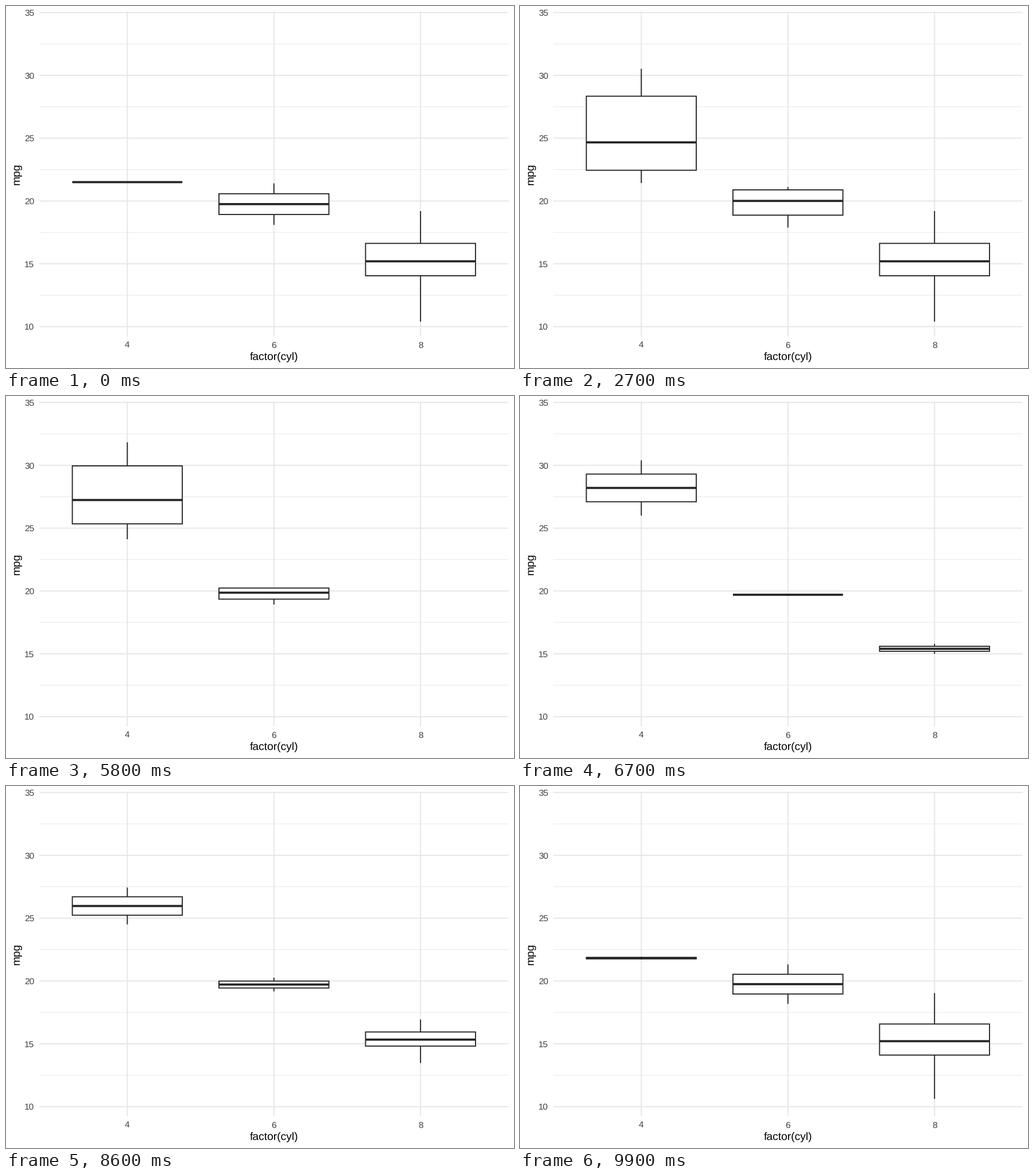
A matplotlib script for the animation above (10 s loop, 885 by 632 pixels).

```python
import matplotlib.pyplot as plt
import numpy as np
from matplotlib.animation import FuncAnimation
from matplotlib.patches import Polygon

W, H, DPI = 885, 632, 64
FRAMES, INTERVAL = 100, 100

PT = 126.4 / 72                    # pixels per typographic point
LINE = 1.873                       # base line weight in pixels
INK, GRID, TICK = "#252525", "#e6e6e6", "#404040"

LEFT, RIGHT, TOP, BOTTOM = 58.1, 875.4, 9.66, 576.8
STEP = (RIGHT - LEFT) / 3.2
UNIT = (BOTTOM - TOP) / 25.85
HALF = 0.375 * STEP

# Five-number summaries (min, q1, median, q3, max) per group and state
STATES = [
    [[21.5] * 5,
     [18.1, 18.925, 19.75, 20.575, 21.4],
     [10.4, 14.05, 15.2, 16.625, 19.2]],
    [[21.4, 22.8, 25.85, 30.9, 33.9],
     [17.8, 18.85, 20.1, 21.0, 21.0],
     None],
    [[26.0, 27.1, 28.2, 29.3, 30.4],
     [19.7] * 5,
     [15.0, 15.2, 15.4, 15.6, 15.8]],
]
# (first frame, last frame, from state, to state)
MOVES = [(11, 33, 0, 1), (45, 67, 1, 2), (79, 100, 2, 0)]

plt.rcParams["font.family"] = "Liberation Sans"
plt.rcParams["text.hinting"] = "no_hinting"


def px(size):
    """Pixels to points for the figure's dpi."""
    return size * 72 / DPI


def y_of(value):
    return TOP + (35.075 - value) * UNIT


def x_of(i):
    return LEFT + (i + 0.6) * STEP


fig = plt.figure(figsize=(W / DPI, H / DPI), dpi=DPI, facecolor="white")
ax = fig.add_axes([0, 0, 1, 1])
ax.set_xlim(0, W)
ax.set_ylim(H, 0)
ax.axis("off")


def line(xs, ys, color, weight, z):
    return ax.plot(xs, ys, color=color, lw=px(weight), zorder=z, snap=False,
                   solid_capstyle="butt")[0]


def label(x, y, text, size, color, **kw):
    ax.text(x, y, text, fontsize=px(size * PT), color=color,
            va="baseline", **kw)


def draw_panel():
    for v in np.arange(12.5, 35, 5):
        line([LEFT, RIGHT], [y_of(v)] * 2, GRID, LINE / 2, 1)
    for v in range(10, 36, 5):
        line([LEFT, RIGHT], [y_of(v)] * 2, GRID, LINE, 1)
        label(49.4, y_of(v) + 5.5, str(v), 8.8, TICK, ha="right")
    for i, name in enumerate("468"):
        line([x_of(i)] * 2, [TOP, BOTTOM], GRID, LINE, 1)
        label(x_of(i), 596.5, name, 8.8, TICK, ha="center")
    label(x_of(1), 618.5, "factor(cyl)", 11, "black", ha="center")
    ax.text(23.5, (TOP + BOTTOM) / 2, "mpg", fontsize=px(11 * PT),
            color="black", rotation=90, rotation_mode="anchor",
            ha="center", va="baseline")


class Box:
    def __init__(self, i):
        self.x = x_of(i)
        self.x0, self.x1 = self.x - HALF, self.x + HALF
        self.low = line([], [], INK, LINE, 3)
        self.high = line([], [], INK, LINE, 3)
        self.body = Polygon([[0, 0]] * 4, closed=True, fc="white", ec=INK,
                            lw=px(LINE), joinstyle="miter", zorder=4,
                            snap=False)
        ax.add_patch(self.body)
        self.mid = line([], [], INK, 2 * LINE, 5)
        self.parts = [self.low, self.high, self.body, self.mid]

    def show(self, stats):
        for part in self.parts:
            part.set_visible(stats is not None)
        if stats is None:
            return
        lo, q1, med, q3, hi = (y_of(v) for v in stats)
        self.low.set_data([self.x] * 2, [lo, q1])
        self.high.set_data([self.x] * 2, [q3, hi])
        self.body.set_xy([[self.x0, q1], [self.x0, q3],
                          [self.x1, q3], [self.x1, q1]])
        self.mid.set_data([self.x0, self.x1], [med, med])


def blend(a, b, t):
    # Groups without a partner leave or arrive only when the move ends
    if t >= 1:
        return b
    if a is None or b is None:
        return a
    return np.array(a) + (np.array(b) - np.array(a)) * t


def stats_at(frame):
    a, b, t = STATES[0], STATES[0], 0
    for start, end, src, dst in MOVES:
        if frame >= start:
            a, b = STATES[src], STATES[dst]
            t = min(1, (frame - start) / (end - start))
    return [blend(p, q, t) for p, q in zip(a, b)]


draw_panel()
boxes = [Box(i) for i in range(3)]


def update(frame):
    for box, stats in zip(boxes, stats_at(frame)):
        box.show(stats)
    return [p for box in boxes for p in box.parts]


def init():
    return update(0)


anim = FuncAnimation(fig, update, frames=FRAMES, init_func=init,
                     interval=INTERVAL, repeat=True, repeat_delay=0,
                     blit=False)
plt.show()
```
